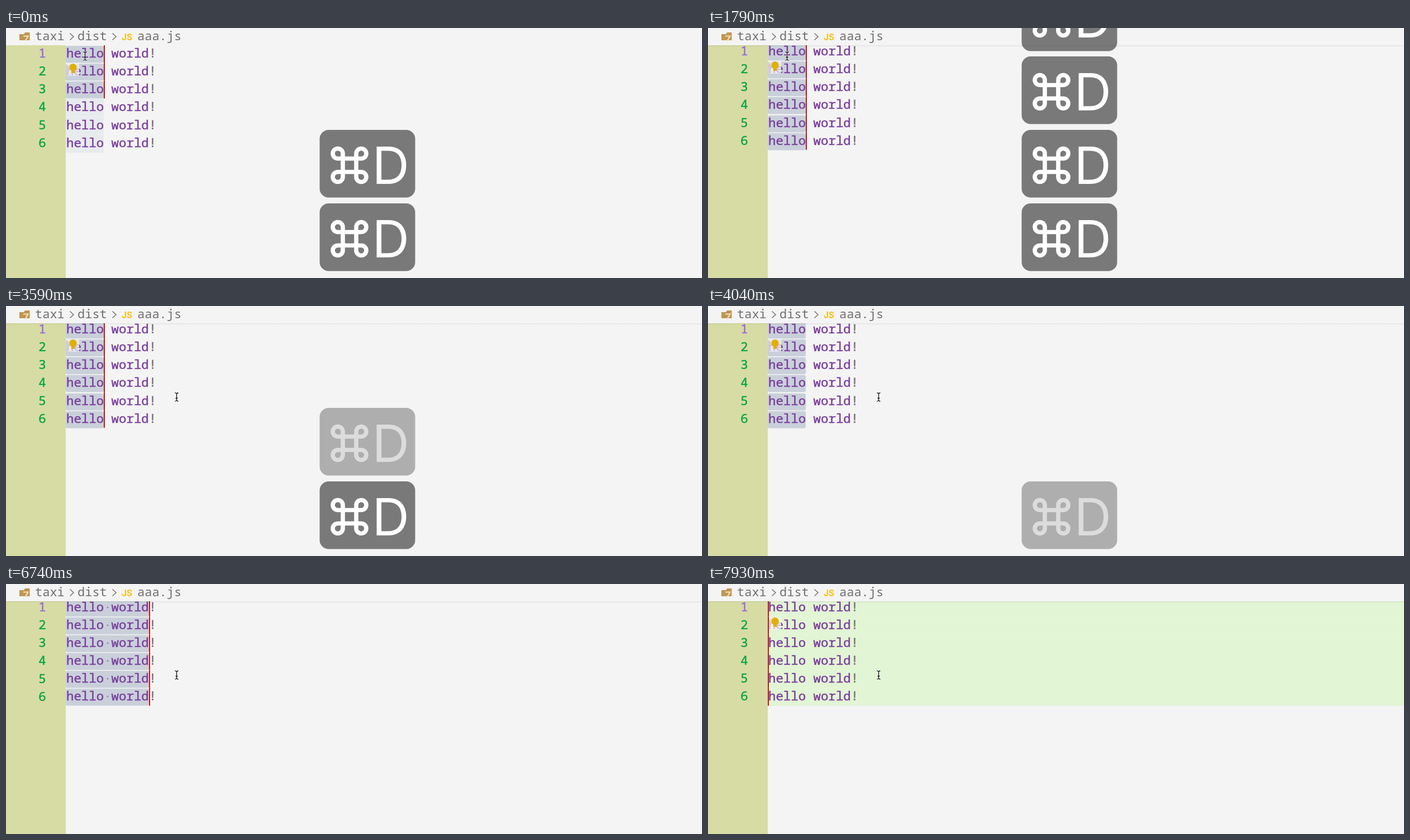
An HTML page that plays this animation: 1246 px wide and 449 px high, repeating every 8 s.

```html
<!DOCTYPE html>
<html lang="en">
<head>
<meta charset="utf-8">
<title>Multi-cursor editing</title>
<style>
  html, body { margin: 0; width: 100%; height: 100%; overflow: hidden; background: #f4f4f4; }
  svg { display: block; width: 100vw; height: 100vh; }
  text { white-space: pre; }
  .code, .num, .crumb { font-family: "Noto Sans Mono", "DejaVu Sans Mono", monospace; }
  .code, .num { font-size: 22.4px; stroke-width: .45px; }
  .code { fill: #7a3e9d; stroke: #7a3e9d; }
  .mark { fill: #777; stroke: #777; }
  .num { fill: #06a546; stroke: #06a546; }
  .num.current { fill: #9769dc; stroke: #9769dc; }
  .crumb { font-size: 22px; fill: #707070; }
  .icon { font: 700 15.5px Inter, "Liberation Sans", sans-serif; fill: #fbc11a; }
  .key { font: 92px Inter, "Liberation Sans", sans-serif; fill: #fff; }
  .line { fill: none; }
</style>
</head>
<body>
<svg viewBox="0 0 1246 449" preserveAspectRatio="xMinYMin meet">
  <defs>
    <linearGradient id="fade" x1="0" y1="0" x2="0" y2="1">
      <stop offset="0" stop-color="#000" stop-opacity=".07"/>
      <stop offset="1" stop-color="#000" stop-opacity="0"/>
    </linearGradient>
    <path id="beam" d="M-3-7.500q3 0 3 2.500q0-2.500 3-2.500M0-5.500v11M-3 7.500q3 0 3-2.500q0 2.500 3 2.500M-2 2h4"/>
  </defs>
  <rect width="1246" height="449" fill="#f4f4f4"/>
  <rect y="31" width="107" height="418" fill="#d7dca4"/>
  <g id="editor"></g>
  <g id="bulb">
    <rect x="109" y="64" width="22" height="22" fill="#f4f4f4" opacity=".7"/>
    <path d="M117 81v-4.2a6.8 6.8 0 1 1 6 0V81z" fill="#e0b000"/>
  </g>
  <rect width="1246" height="31" fill="#f4f4f4"/>
  <rect id="shadow" y="31" width="1246" height="3" fill="url(#fade)"/>
  <g class="crumb">
    <path d="M24 11h8l2-3h8.500v14H24z" fill="#c09553"/>
    <path class="line" d="M31 14.500h8.500L34 24" stroke="#f3e3bd" stroke-width="2.2"/>
    <text x="52" y="22">taxi</text>
    <text x="128" y="22">dist</text>
    <text x="235" y="22">aaa.js</text>
    <path class="line" d="M114.500 9.500l6.500 6-6.500 6M190.500 9.500l6.500 6-6.500 6" stroke="#777" stroke-width="1.6"/>
    <text class="icon" x="207" y="22">JS</text>
  </g>
  <g id="cards"></g>
  <g id="mouse" class="line">
    <use href="#beam" stroke="#fff" stroke-width="3" opacity=".8"/>
    <use href="#beam" stroke="#111" stroke-width="1.3"/>
  </g>
</svg>
<script>
const LOOP = 8000, ROWS = 6, STEP = 150, LEFT = 107;
const SCROLL = 1790, EXTEND = 5840, SHRINK = 6890, COLLAPSE = 7780;
const $ = id => document.getElementById(id);
const between = (t, a, b) => t >= a && t < b;
const show = (el, on) => el.setAttribute('visibility', on ? 'visible' : 'hidden');
const rect = (x, y, w, h, fill, r = 0) =>
  `<rect x="${x}" y="${y}" width="${w}" height="${h}" rx="${r}" fill="${fill}"/>`;

// Caret hidden from the first to the second time of each pair
const blinks = [[1940, 2390], [2840, 3290], [3890, 4340], [4940, 5240],
  [5690, 5840], [6290, 6740], [7490, 7780]];
const LOOP_SIGN = 'M-12-21A9 9 0 1 0-21-12H21A9 9 0 1 0 12-21V21A9 9 0 1 0 21 12H-21A9 9 0 1 0-12 21Z';

// Shortcut cards, oldest at the top
const cards = [-80, 51, 183, 315].map((y, i) => ({
  from: [890, 450, 0, 0][i],
  fade: 2690 + 450 * i,
  y
}));
$('cards').innerHTML = cards.map(c => `<g transform="translate(561.500 ${c.y})">
  <rect width="171" height="121.500" rx="16"/>
  <g><path class="line" transform="translate(53.500 63.500)" d="${LOOP_SIGN}" stroke="#fff" stroke-width="7.600"/>
  <text class="key" x="94" y="97">D</text></g></g>`).join('');
const cardNodes = [...$('cards').children];

function drawCards(t) {
  cards.forEach((c, i) => {
    const alpha = t < c.fade ? 1 : t < c.fade + STEP ? .57 : 0;
    const [plate, face] = cardNodes[i].children;
    show(cardNodes[i], t >= c.from && alpha > 0);
    plate.setAttribute('opacity', alpha / 2);
    face.setAttribute('opacity', alpha);
  });
}

function caretX(t) {
  if (t < EXTEND) return 175;
  if (t < SHRINK) return 256;
  return t < COLLAPSE ? 189 : 107;
}

function drawEditor(t) {
  const scroll = t < SCROLL ? 0 : 4;
  const picked = 3 + [450, 890, 1340].filter(at => t >= at).length;
  const x = caretX(t), caretOn = !blinks.some(([a, b]) => between(t, a, b));
  let back = '', front = '';
  for (let i = 0; i < ROWS; i++) {
    const top = 30.6 + 32 * i - scroll;
    const nudge = until => i > 3 && t < until ? 1 : 0;
    const y = top + nudge(EXTEND), numY = top + nudge(COLLAPSE) + 22.8;
    if (t >= COLLAPSE) back += rect(LEFT, top, 1139, 32, '#e2f5d4');
    else if (i < picked) back += rect(LEFT, y + 1.5, x - LEFT, 30.5, '#c9d0da', 3);
    else back += rect(LEFT, y, 68, 32.5, '#e8ebee');
    const dot = between(t, EXTEND, COLLAPSE)
      ? `<circle cx="182" cy="${y + 15.5}" r="1.700" fill="#94969e"/>` : '';
    front += `<text class="num${i ? '' : ' current'}" x="58.300" y="${numY}">${i + 1}</text>
      <text class="code" x="108" y="${y + 22.8}">hello world<tspan class="mark">!</tspan></text>${dot}`;
    if (caretOn && i < picked) front += rect(x, top, 2, 32, '#cc100e');
  }
  $('editor').innerHTML = back + front;
  show($('shadow'), scroll);
  show($('bulb'), t < EXTEND || between(t, 7040, COLLAPSE) || t >= 7930);
  $('bulb').setAttribute('transform', `translate(0 ${-scroll})`);
}

function drawMouse(t) {
  const held = Math.floor((t - SCROLL) / STEP) * STEP;
  const p = Math.min(1, Math.max(0, held / 600));
  const k = p * p * (3 - 2 * p);
  $('mouse').setAttribute('transform', `translate(${141.5 + 164 * k} ${50.5 + 113 * k})`);
}

function draw(t) {
  drawEditor(t);
  drawCards(t);
  drawMouse(t);
}

const start = performance.now();
function tick() {
  draw((performance.now() - start) % LOOP);
  requestAnimationFrame(tick);
}
tick();
</script>
</body>
</html>
```
